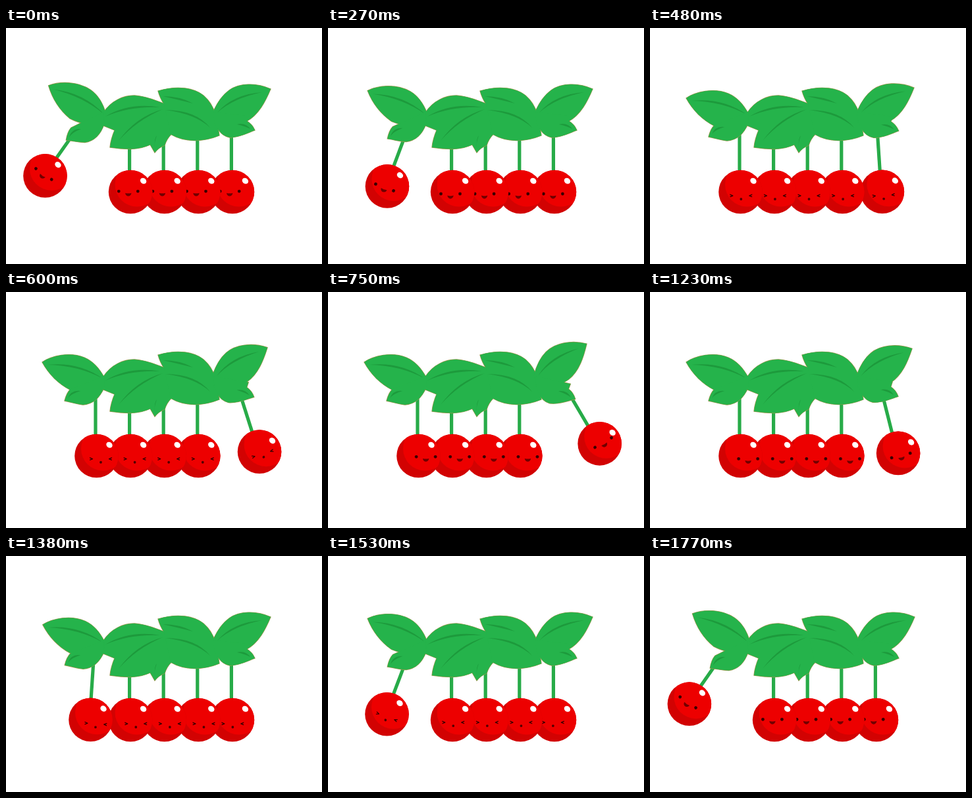
Animation, 480 px wide and 360 px high, one loop 1800 ms. Source, as an HTML page:

```html
<!DOCTYPE html>
<html lang="en">
<head>
<meta charset="utf-8">
<title>Cherry cradle</title>
<style>
html, body { margin: 0; width: 100%; height: 100%; overflow: hidden; background: #fff; }
svg { display: block; width: 100vw; height: 100vh; }
.stem { stroke: #27ab48; stroke-width: 5.2; }
.leaf { fill: #25b34b; }
.vein { fill: #1d9a3c; }
.squint { fill: none; stroke: #300; stroke-width: 1.3; stroke-linecap: round; stroke-linejoin: round; }
</style>
</head>
<body>
<svg id="stage" viewBox="0 0 480 360">
  <defs><clipPath id="skin"><circle r="33.3"/></clipPath></defs>
  <g id="stems"></g>
  <use href="#leaves" stroke="#a3954c" stroke-width="1.3"/>
  <g id="leaves"></g>
  <g id="cherries"></g>
</svg>
<script>
const PERIOD = 1800, SWING = 35, PIVOT_Y = 114, LENGTH = 136, SQUINT = 225;
const COUNT = 5, LAST = COUNT - 1;
const restX = i => 137.5 + 51.6 * i;
const radians = degrees => degrees * Math.PI / 180;
const byId = id => document.getElementById(id);

function add(parent, tag, attrs = {}) {
  const node = document.createElementNS('http://www.w3.org/2000/svg', tag);
  for (const key in attrs) node.setAttribute(key, attrs[key]);
  return parent.appendChild(node);
}

// A leaf with tapered veins given as [x1, y1, cx, cy, x2, y2]
function leaf(outline, ...veins) {
  const g = add(byId('leaves'), 'g');
  add(g, 'path', { class: 'leaf', d: outline });
  for (const [x1, y1, cx, cy, x2, y2] of veins) {
    add(g, 'path', { class: 'vein', stroke: 'none',
      d: `M${x1} ${y1}Q${cx} ${cy - 3} ${x2} ${y2}Q${cx} ${cy + 3} ${x1} ${y1}Z` });
  }
  return g;
}

leaf('M148 129C160 111 178 103 195 103C213 104 228 111 242 116L252 161C247 166 243 172 241 179C235 181 230 185 226 190L219 178C200 187 180 185 158 182C159 172 162 163 165 156L148 149Z',
  [151, 135, 188, 116, 234, 121], [171, 172, 198, 138, 238, 124], [226, 181, 225, 172, 229, 164]);
leaf('M231 96C262 87 286 92 300 103C309 111 315 121 317 130C320 145 323 155 324 164C300 174 272 175 250 162L240 116C236 110 233 103 231 96Z',
  [238, 104, 264, 107, 284, 115], [242, 125, 288, 128, 310, 152]);
const leftBig = leaf('M55 107C70 97 97 91 119 100C133 106 142 117 149 130L150 146C140 154 115 154 97 149C80 140 66 127 55 107Z',
  [63, 111, 110, 109, 147, 132]);
const rightBig = leaf('M402 93C380 83 354 84 339 95C328 103 321 114 315 127L315 145C335 153 352 149 366 142C384 132 394 112 402 93Z',
  [389, 98, 345, 104, 321, 129]);
const leftSmall = leaf('M89 166C91 158 94 152 98 148L149 128L149 146C142 162 132 171 117 172C108 171 99 168 89 166Z',
  [94, 162, 99, 152, 113, 151]);
const rightSmall = leaf('M378 156C375 149 371 145 366 142L368 134L314 128C316 148 324 164 340 167C355 167 367 160 378 156Z',
  [371, 154, 364, 147, 351, 147]);

function makeCherry(i) {
  const x = restX(i) - 1.5;
  const stem = add(byId('stems'), 'line',
    { class: 'stem', x1: x, y1: PIVOT_Y + 48, x2: x, y2: PIVOT_Y + LENGTH - 25 });
  const body = add(byId('cherries'), 'g');
  byId('cherries').prepend(body); // cherries further left sit in front
  add(body, 'circle', { r: 33.3, fill: '#d20202' });
  add(body, 'circle', { cx: 10, cy: -11, r: 33.5, fill: '#ed0000', 'clip-path': 'url(#skin)' });
  add(body, 'ellipse', { rx: 5, ry: 4.2, fill: '#fff', transform: 'translate(19.5 -16.8) rotate(40)' });
  const face = add(body, 'g');
  const happy = add(face, 'g');
  for (const side of [-1, 1]) add(happy, 'circle', { cx: 14.5 * side, r: 2.4, fill: '#3a0000' });
  add(happy, 'path', { d: 'M-4.7 2.6Q0 4 4.7 2.6C4.2 9-4.2 9-4.7 2.6Z', fill: '#700000' });
  const hurt = add(face, 'g');
  add(hurt, 'path', { class: 'squint', d: 'M-16.5-1.9L-12.5-.2L-16.3 1.4M16.5-1.9L12.5-.2L16.3 1.4' });
  add(hurt, 'circle', { cy: 5, r: 1.9, fill: '#500000' });
  return { stem, body, face, happy, hurt };
}
const cherries = Array.from({ length: COUNT }, (_, i) => makeCherry(i));

// The faces slide across the skin, a little behind the swing
function lookAt(i, phase) {
  const x = i === LAST
    ? 1 - 5.2 * Math.cos(phase)
    : 4.5 - 8.5 * Math.tanh(1.7 * Math.cos(phase - radians(22)));
  const y = 2.5 - 3.5 * Math.cos(2 * (phase - radians(5)));
  return `translate(${x} ${y})`;
}

function turn(node, angle, x, y) {
  node.setAttribute('transform', `rotate(${angle} ${x} ${y})`);
}

function draw(t) {
  const phase = 2 * Math.PI * t / PERIOD;
  const angle = SWING * Math.cos(phase);
  const left = Math.max(0, angle), right = Math.min(0, angle);
  const hurting = (t + PERIOD / 4) % (PERIOD / 2) < SQUINT;

  cherries.forEach(({ stem, body, face, happy, hurt }, i) => {
    const a = i === 0 ? left : i === LAST ? right : 0;
    const x = restX(i) - LENGTH * Math.sin(radians(a));
    const y = PIVOT_Y + LENGTH * Math.cos(radians(a));
    body.setAttribute('transform', `translate(${x} ${y})`);
    turn(stem, a, restX(i), PIVOT_Y);
    face.setAttribute('transform', `rotate(${a}) ${lookAt(i, phase)}`);
    happy.setAttribute('display', hurting ? 'none' : 'inline');
    hurt.setAttribute('display', hurting ? 'inline' : 'none');
  });

  turn(leftBig, left * 0.35, 149, 142);
  turn(leftSmall, left * -0.14, 149, 142);
  turn(rightBig, right * 0.315, 314, 140);
  turn(rightSmall, right * -0.22, 314, 140);
}

const start = performance.now();
function tick() {
  draw((performance.now() - start) % PERIOD);
  requestAnimationFrame(tick);
}
tick();
</script>
</body>
</html>
```
